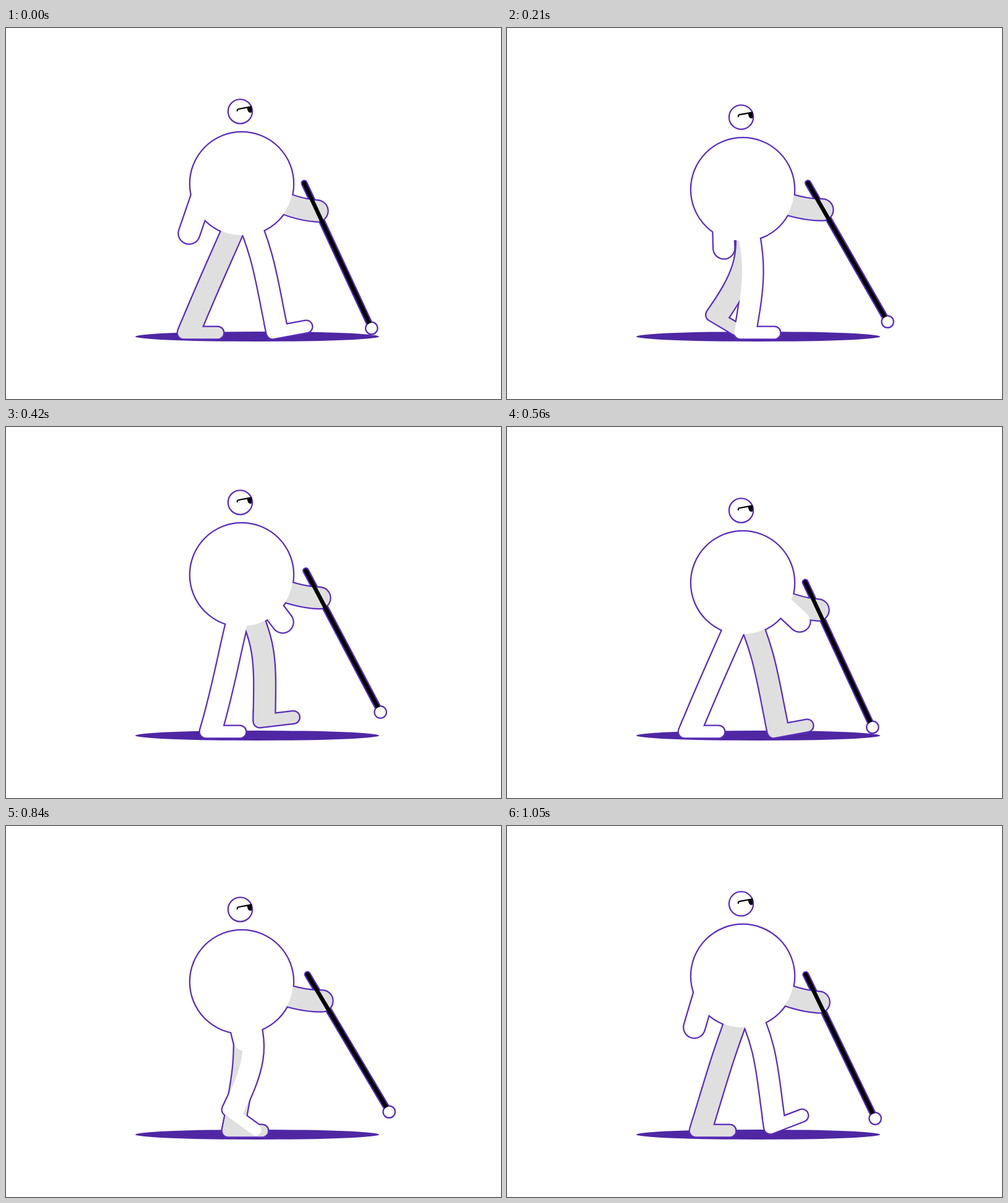
These frames come from a looping animation (800x600 px, 1120 ms). An HTML page with a canvas:

```html
<!DOCTYPE html>
<html lang="en">
<head>
<meta charset="utf-8">
<title>Walker with cane</title>
<style>
  html, body { margin: 0; width: 100%; height: 100%; overflow: hidden; background: #fff; }
  canvas { display: block; width: 800px; height: 600px; }
</style>
</head>
<body>
<canvas id="stage" width="800" height="600"></canvas>
<script>
const ctx = document.getElementById('stage').getContext('2d');
const STEP = 70, STEPS = 16, HALF = STEPS / 2;
const WHITE = '#fff', GREY = '#dfdfdf', LINE = '#5a2dbd', GROUND = '#4f27a3';
const RAD = Math.PI / 180;

// Joint angles in degrees at key steps of one stride
const THIGH = [[1, 23], [8, -23.4], [13, 30]];
const SHIN = [[0, 12], [3, -10], [7, -17], [10, -38]];
const PITCH = [[1, 0], [8, 0], [12, 36], [15, -21]];

const wrap = s => (s + STEPS) % STEPS;
const down = deg => [Math.sin(deg * RAD), Math.cos(deg * RAD)];

// Cosine easing between keys on the looping stride
function ease(keys, s) {
  for (let i = 0; i < keys.length; i++) {
    const [t0, a] = keys[i], [t1, b] = keys[(i + 1) % keys.length];
    const t = wrap(s - t0) / wrap(t1 - t0);
    if (t < 1) return a + (b - a) * (1 - Math.cos(Math.PI * t)) / 2;
  }
}

// The heel slides back on the ground, then swings forward in an arc
function heel(s) {
  if (s < HALF) return [431 - 18 * s, 493];
  const a = Math.PI * (s - HALF) / HALF;
  return [359 - 72 * Math.cos(a), 493 - 34 * Math.sin(a) ** 2];
}

function part(color, width, cap, build) {
  const path = new Path2D();
  build(path);
  return { color, width, cap, path };
}

function disc(x, y, r) {
  return part(WHITE, r * 1.2, 'round', p => p.arc(x, y, r * 0.4, 0, 7));
}

function leg(step, color, dy) {
  const s = wrap(step);
  const hip = [383, 290 + dy];
  const [hx, hy] = heel(s);
  const [ux, uy] = down(ease(THIGH, s)), [sx, sy] = down(ease(SHIN, s));
  const [toeY, toeX] = down(ease(PITCH, s));
  const ankle = [hx + 7.5 * sy, hy - 7.5 * sx];
  const bend = 0.42 * Math.hypot(ankle[0] - hip[0], ankle[1] - hip[1]);
  const limb = part(color, 33.5, 'butt', p => {
    p.moveTo(...hip);
    p.bezierCurveTo(hip[0] + ux * bend, hip[1] + uy * bend,
      ankle[0] - sx * bend, ankle[1] - sy * bend, ...ankle);
  });
  const foot = part(color, 18.5, 'round', p => {
    p.moveTo(hx - sx * 16, hy - sy * 16);
    p.lineTo(hx, hy);
    p.lineTo(hx + 55 * toeX, hy + 55 * toeY);
  });
  return [limb, foot];
}

function caneArm(c, dy) {
  return part(GREY, 33, 'round', p => {
    p.moveTo(420, 266 + 4 * c + dy);
    p.quadraticCurveTo(468 - 3 * c, 288.5 + 5 * c + dy, 507 - 4 * c, 289.5 + 6.5 * c + dy);
  });
}

function freeArm(swing, dy) {
  const x = 384.5 - 88.5 * swing;
  const y = 347 + 9 * swing - 24 * swing * swing + dy;
  const [fx, fy] = down(14 - 33 * swing);
  return part(WHITE, 33, 'round', p => {
    p.moveTo(381, 240 + dy);
    p.lineTo(x - 66 * fx, y - 66 * fy);
    p.lineTo(x, y);
  });
}

function cane(c, dy) {
  const [ty, tx] = down(62.2 + 2.9 * c);
  const x = 484.6 - 2.6 * c, y = 245.5 + 5.5 * c + dy;
  const tip = [x + 258.5 * tx, y + 258.5 * ty];
  const stick = part('#000', 6.5, 'round', p => {
    p.moveTo(x, y);
    p.lineTo(...tip);
  });
  return [stick, disc(...tip, 8.6)];
}

function stroke({ path, width, cap }, color, extra) {
  ctx.lineCap = cap;
  ctx.lineWidth = width + extra;
  ctx.strokeStyle = color;
  ctx.stroke(path);
}

// Shared outline first, so overlapping parts merge without inner lines
function paint(parts) {
  parts.forEach(p => stroke(p, LINE, 4.5));
  parts.forEach(p => stroke(p, p.color, 0));
}

function glasses(dy) {
  ctx.save();
  ctx.translate(0, dy);
  ctx.strokeStyle = ctx.fillStyle = '#000';
  ctx.lineWidth = 2.2;
  ctx.lineCap = 'round';
  ctx.stroke(new Path2D('M373.8 134 Q373.5 131.5 376 131 L396 127.4'));
  ctx.fill(new Path2D('M389.5 128 L397 126.5 L397 136.5 Q390.5 139 389.5 128 Z'));
  ctx.restore();
}

function draw(step) {
  const stride = step / STEPS * 2 * Math.PI;
  const dy = 13 * Math.sin(2 * stride);
  const c = Math.cos(2 * stride);

  ctx.clearRect(0, 0, 800, 600);
  ctx.lineJoin = 'round';
  ctx.fillStyle = GROUND;
  ctx.beginPath();
  ctx.ellipse(406, 499, 197, 8, 0, 0, 7);
  ctx.fill();

  paint([
    caneArm(c, dy),
    ...leg(step + HALF, GREY, dy),
    ...leg(step, WHITE, dy),
    disc(381, 252 + dy, 83),
    freeArm(Math.cos(stride), dy),
    disc(378.5, 135 + dy, 18.5),
    ...cane(c, dy)
  ]);
  glasses(dy);
}

const start = performance.now();
let shown = -1;

function tick() {
  const step = Math.floor((performance.now() - start) / STEP) % STEPS;
  if (step !== shown) draw(shown = step);
  requestAnimationFrame(tick);
}
tick();
</script>
</body>
</html>
```
